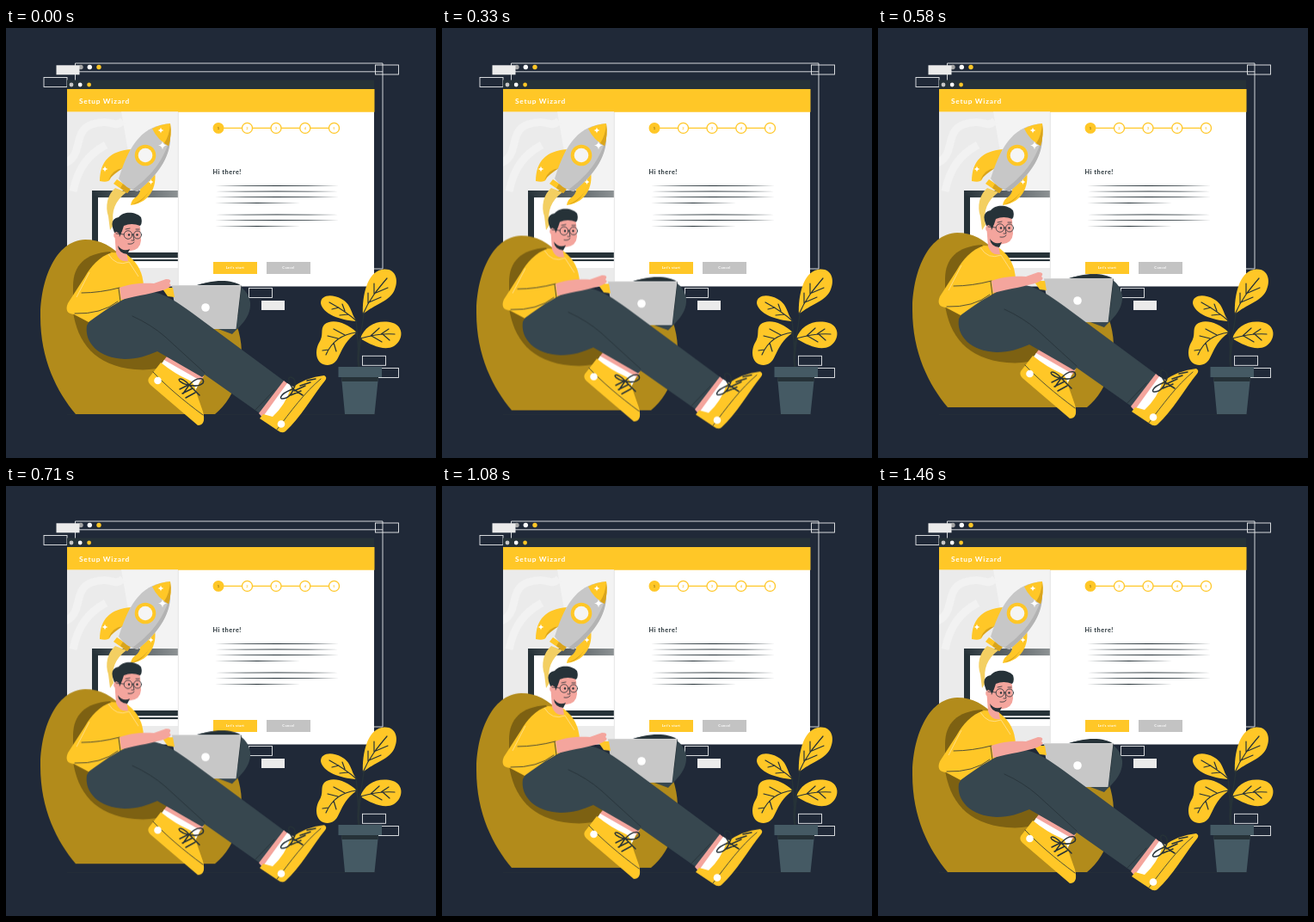
Animation of 500x500 px, one loop 1.5 s. Source, as an HTML page without scripts:

```html
<!DOCTYPE html>
<html lang="en">
<head>
<meta charset="utf-8">
<title>Setup wizard</title>
<style>
  html, body { margin: 0; width: 100%; height: 100%; overflow: hidden; background: #202938; }
  svg { display: block; width: 100%; height: 100%; }
  text { font-family: Lato, Inter, sans-serif; font-weight: 700; }
  .yellow { fill: #ffc727; }
  .white { fill: #fff; }
  .ink { fill: #263238; }
  .grey { fill: #c7c7c7; }
  .skin { fill: #f4a59d; }
  .leg { fill: #37474f; }
  .pot { fill: #455a64; }
  .line { fill: none; stroke: #263238; stroke-width: .8; stroke-linecap: round; stroke-linejoin: round; }
  .bold { stroke-width: 1.5; }
  .wire { fill: none; stroke: #e8eaed; stroke-width: .9; }
  .step { stroke: #ffc727; stroke-width: 1.3; }
  .digit { font-size: 4px; text-anchor: middle; fill: #ffc727; }
  .label { font-size: 4.2px; letter-spacing: .3px; text-anchor: middle; fill: #fff; }
  .float { animation: float 1.5s linear infinite; }
  @keyframes float {
    0%, 97.3%, 100% { transform: none; }
    48.6% { transform: translateY(-10px); }
  }
</style>
</head>
<body>
<svg viewBox="0 0 500 500">
  <defs>
    <linearGradient id="bezel">
      <stop stop-color="#263238"/><stop offset="1" stop-color="#8d9294"/>
    </linearGradient>
    <path id="long" d="M243 0Q315 -1 387 0Q315 1 243 0"/>
    <path id="short" d="M243 0Q292 -.8 342 0Q292 .8 243 0"/>
    <path id="spark" d="M0 -5Q.6 -.6 5 0Q.6 .6 0 5Q-.6 .6 -5 0Q-.6 -.6 0 -5"/>
    <rect id="tag" width="27" height="11"/>
    <clipPath id="panel"><path d="M71 97.500H200V300H71Z"/></clipPath>
  </defs>

  <!-- Rear window -->
  <path class="wire" d="M80.500 61V41H438V280H428M80 50.800H438"/>
  <circle cx="87" cy="45.500" r="2.700" fill="#a6a6a6"/>
  <circle cx="97.300" cy="45.500" r="2.700" class="white"/>
  <circle cx="108" cy="45.500" r="2.700" class="yellow"/>
  <use href="#tag" x="58.500" y="43.300" fill="#ebebeb"/>
  <use href="#tag" x="429.500" y="43" class="wire"/>
  <use href="#tag" x="44" y="57.500" class="wire"/>

  <!-- Main window -->
  <path class="white" d="M71 97H428V300.500H71Z"/>
  <path class="ink" d="M71 60.500H428V72H71Z"/>
  <path class="yellow" d="M71 71H428.500V97.700H71Z"/>
  <circle cx="76" cy="66" r="2.400" fill="#c7c7c7"/>
  <circle cx="86.200" cy="66" r="2.400" class="white"/>
  <circle cx="96.600" cy="66" r="2.400" class="yellow"/>
  <text x="85" y="88" font-size="8.300" letter-spacing=".75" class="white">Setup Wizard</text>

  <g clip-path="url(#panel)">
    <path fill="#ebebeb" d="M71 97H200V300H71Z"/>
    <path fill="#f3f3f3" d="M134 97H200V190H150Z"/>
    <g fill="none" stroke="#f2f2f2" stroke-width="9">
      <path d="M66 158C92 150 76 120 100 112S124 118 136 108"/>
      <path d="M78 190C84 160 98 146 116 136"/>
    </g>
    <path fill="url(#bezel)" d="M100 189H200V197H100Z"/>
    <path class="ink" d="M100 195H107V271H100ZM107 261H200V267.500H107ZM107 269H200V271.200H107Z"/>
    <path class="white" d="M107 197.500H200V261H107ZM107 267.500H200V269H107ZM100 271.200H200V279H100Z"/>
  </g>
  <path stroke="#e4e4e4" d="M200.300 98V300"/>

  <!-- Rocket -->
  <path fill="#f3cf62" d="M127 186C118 194 115 207 119 219L121 235L125 229C122 212 127 201 140 191Z"/>
  <path class="yellow" d="M145 141C121 143 109 155 109 178Q119 180 121 176C124 167 131 164 136 163ZM172 163C177 180 170 203 145 206Q146 199 152 196C158 190 156 185 155 183Z"/>
  <path fill="#d9a41c" d="M136 163Q124 164 119 177Q126 169 136 163ZM171 180Q165 198 147 205Q162 203 171 180Z"/>
  <path class="yellow" d="M129 176L145 187L141 192L125 181Z"/>
  <path fill="#d9a41c" d="M136 181L145 187L141 192L133 186Z"/>
  <path class="grey" d="M191 111C160 114 145 131 131 175Q140 188 153 190C184 165 193 144 191 111Z"/>
  <path fill="#b3b3b3" d="M190 130C182 157 167 173 147 188L153 190C181 167 192 146 191 125Z"/>
  <path class="yellow" d="M191 111Q179 112 170 117Q176 130 189 137Q193 124 191 111Z"/>
  <path fill="#d9a41c" d="M191 112Q190 125 184 134L189 137Q193 124 191 112Z"/>
  <circle cx="162" cy="148" r="12.300" class="yellow"/>
  <circle cx="162" cy="148" r="8.300" fill="#f5f5f5"/>
  <g class="white">
    <use href="#spark" transform="translate(180 119) scale(.7)"/>
    <use href="#spark" x="182" y="136.500"/>
    <use href="#spark" transform="translate(115 164) scale(.7)"/>
    <use href="#spark" transform="translate(168.500 179) scale(.6)"/>
  </g>

  <!-- Wizard page -->
  <path class="step" d="M247 116.400H381"/>
  <g class="step white">
    <circle cx="247" cy="116.400" r="5.800" class="yellow"/>
    <circle cx="280.500" cy="116.400" r="6"/>
    <circle cx="314" cy="116.400" r="6"/>
    <circle cx="347.800" cy="116.400" r="6"/>
    <circle cx="381.500" cy="116.400" r="6"/>
  </g>
  <g class="digit">
    <text x="247" y="117.900" fill="#7d6112">1</text>
    <text x="280.500" y="117.900">2</text>
    <text x="314" y="117.900">3</text>
    <text x="347.800" y="117.900">4</text>
    <text x="381.500" y="117.900">5</text>
  </g>
  <text x="240.500" y="170" font-size="7.300" letter-spacing=".55" class="ink">Hi there!</text>
  <g class="ink">
    <use href="#long" y="183.500"/><use href="#long" y="190"/><use href="#long" y="196.500"/><use href="#short" y="203.500"/>
    <use href="#long" y="217"/><use href="#long" y="223.500"/><use href="#short" y="230.500"/>
  </g>
  <path class="yellow" d="M241 272H292V286H241Z"/>
  <path fill="#c3c3c3" d="M303 272H354V286H303Z"/>
  <text x="266.500" y="280.400" class="label">Let's start</text>
  <text x="328.500" y="280.400" class="label">Cancel</text>

  <use href="#tag" x="282.500" y="302.500" class="wire"/>
  <use href="#tag" x="297" y="317" fill="#ebebeb"/>
  <use href="#tag" x="414.500" y="381.300" class="wire"/>
  <use href="#tag" x="429.500" y="395.500" class="wire"/>
  <path d="M71 449.500H430" stroke="#263038" stroke-width=".7"/>

  <!-- Plant -->
  <path class="yellow" d="M415 333C414 311 420 284 437 281C453 278 457 293 452 304C447 318 428 321 415 333ZM408 341C388 340 368 332 366 320C366 310 379 309 390 315C402 321 401 333 408 341ZM408 354C394 341 378 338 370 345C365 351 370 357 364 366C358 377 361 392 374 392C391 391 384 371 408 354ZM412 361C417 346 433 338 450 343C462 347 463 362 451 370C440 376 425 369 412 361Z"/>
  <path class="line bold" d="M410 395C406 375 414 356 416 332M411 395C409 370 409 355 407 340M410 390C411 373 411 367 413 361M410 385Q410 361 407 354"/>
  <g class="line" style="stroke-width: 1.2">
    <path d="M415 333C422 316 432 304 443 291M421 320L421 308M428 309L428 297M422 319L436 313M430 308L444 302M408 341C398 332 387 325 376 319M394 329L391 321M387 325L379 327M398 333L388 334"/>
    <path d="M408 354C390 356 378 366 372 380M394 357L381 350M386 361L374 358M381 366L384 376M375 374L368 375M412 361C426 357 439 355 452 356M424 358L434 349M436 356L445 350M425 358L437 365M438 356L446 363"/>
  </g>
  <path class="pot" d="M386.500 394H437V406H386.500ZM390 406H433L428.500 449H394Z"/>
  <path class="ink" d="M390 406H433L432.500 411H390.500Z"/>

  <g class="float">
    <!-- Bean bag -->
    <path fill="#b28b1b" d="M81 449C59 423 40 385 40 336C40 294 57 247 92 246C110 246 124 254 137 268L150 310L225 345H268C283 385 268 429 243 449Z"/>
    <path fill="#7d6112" d="M121 260C92 262 78 276 78 300V330C83 365 103 393 150 397C176 399 192 393 201 380L150 300Z"/>

    <!-- Far leg and laptop -->
    <path class="leg" d="M218 300C245 292 279 291 284 319C285 335 275 344 263 356L220 340Z"/>
    <path class="ink" d="M218 301C240 292 262 292 274 300L270 335L220 340Z"/>
    <path class="grey" d="M193 299H273.500L267.500 350H215Q195 337 193 299Z"/>
    <path d="M193 299.500H273" stroke="#dadada" stroke-width=".7"/>
    <circle cx="232" cy="325" r="4.800" class="white"/>

    <!-- Left shoe -->
    <path class="skin" d="M187 382L230 405L226 411L183 387Z"/>
    <path class="white" d="M184 386L226 410L220 422L178 394Z"/>
    <path class="yellow" d="M180 389Q196 402 212 409Q219 411 222 426L229 446Q233 462 223 462L168 415Q164 411 166 407Z"/>
    <path class="line" d="M171 400C186 416 206 433 229 450"/>
    <circle cx="176.500" cy="410" r="4.300" class="white"/>
    <path class="line bold" d="M202 420L212 415M205 425L217 419M209 430L220 424M211 415C194 410 202 402 213 415C222 405 232 406 229 413Q223 418 213 415L206 425M213 415L225 427"/>

    <!-- Near leg -->
    <path class="leg" d="M94 346C105 326 139 305 165 306C186 308 200 320 216 331L323.500 410.500L295 448L231 403L228 406L176 376C164 381 153 385 138 385C108 384 91 366 94 346Z"/>
    <path class="line" d="M147 335Q169 345 185 359L231 401M312 421L290 444"/>

    <!-- Right shoe -->
    <path class="skin" d="M323 410L328 414L299 454L294 448Z"/>
    <path class="white" d="M327 413L337 419L311 458L298 453Z"/>
    <path class="yellow" d="M331 419Q349 406 370 404Q374 406 371 410C357 427 342 454 325 469Q321 472 316 468L295 454L299 449L310 452Q325 438 331 419Z"/>
    <path class="line" d="M366 408C347 424 331 446 315 467"/>
    <circle cx="320" cy="460.500" r="4.300" class="white"/>
    <path class="line bold" d="M331 427L343 422M335 422L348 416M342 416L354 412M350 410L360 408M333 420C317 426 316 434 326 430Q332 427 334 420C325 407 329 403 335 408Q338 414 334 420L345 427"/>

    <!-- Body -->
    <path class="yellow" d="M123 261C108 266 99 277 92 289L72 320Q67 332 79 333L96 342C116 327 139 312 160 306Q161 282 146 268L139 262Z"/>
    <path class="line" d="M88 308Q109 308 132 302M80 332Q111 333 130 318M131 303L133 318"/>
    <path fill="none" stroke="#ffe39a" stroke-width=".8" d="M119 263Q128 278 143 272L154 289M97 284L82 313"/>
    <path class="yellow" d="M181 302L194 302L196 313L188 312Z"/>
    <path class="skin" d="M132 302C143 297 160 296 172 297L186 292Q194 292 190 297Q195 300 185 304C174 308 154 311 134 316Z"/>

    <!-- Head -->
    <path class="skin" d="M126 236L128 262Q132 273 142 271L140 260Z"/>
    <path class="skin" d="M128 231C131 222 154 220 156 232L157 247Q156 258 145 259C136 262 127 252 126 239Z"/>
    <path class="ink" d="M130 253Q136 261 144 257L141 263Q131 262 130 253Z"/>
    <path class="ink" d="M126 238Q119 222 131 220C137 212 152 214 157 220Q159 227 156 230Q146 226 137 230L135 236L132 243L129 237Z"/>
    <circle cx="128.500" cy="241" r="3.300" class="skin"/>
    <g class="line">
      <circle cx="142" cy="240.500" r="4.800"/><circle cx="153" cy="240.500" r="4.500"/>
      <path d="M128 239L137 240M147 240H148.500M139 234L144 233M151 234L155 234M148 241L149 247L146 247M142 251Q147 252 149 249"/>
    </g>
    <circle cx="143" cy="240.500" r="1.200" class="ink"/>
    <circle cx="152.500" cy="240.500" r="1.200" class="ink"/>
  </g>
</svg>
</body>
</html>
```
